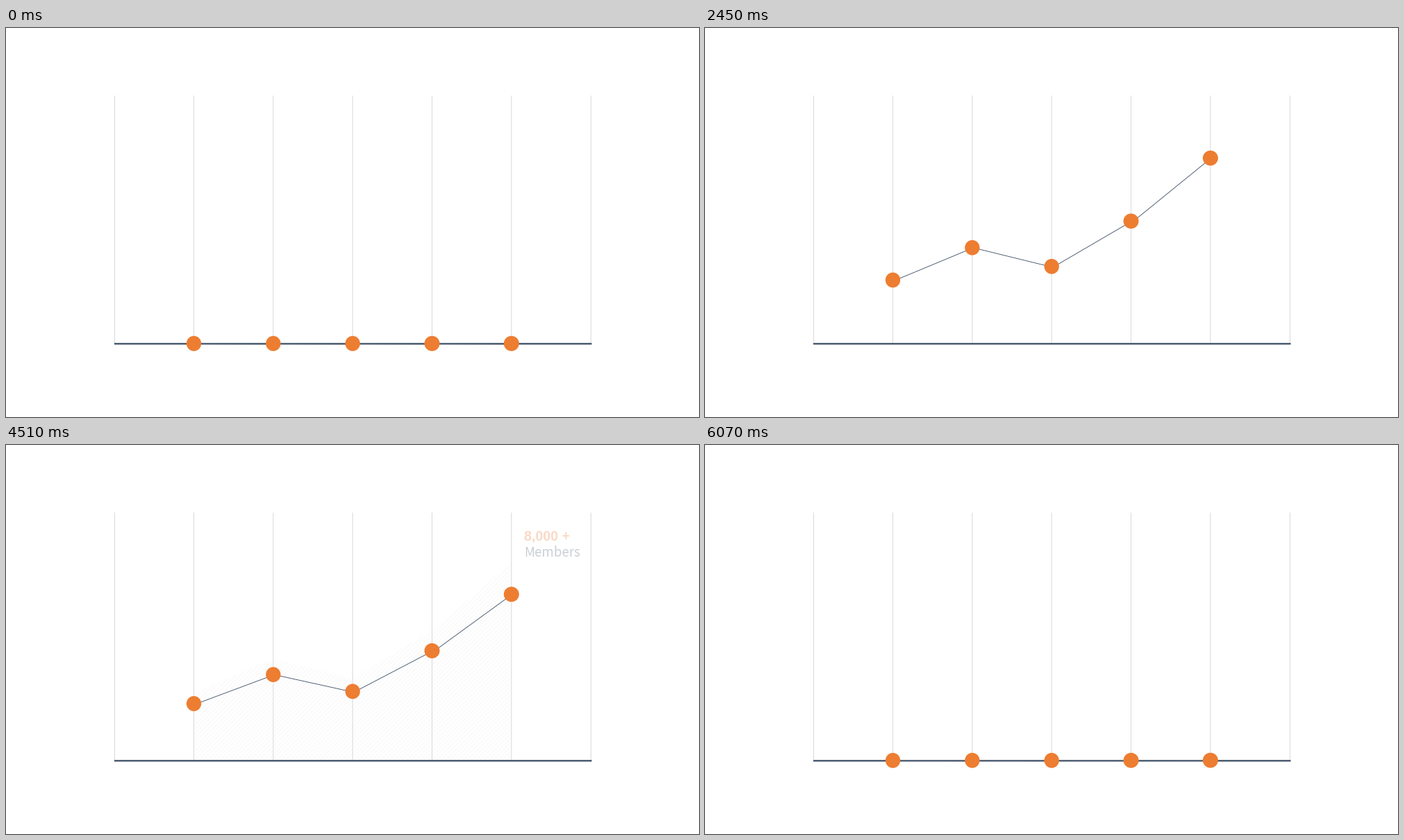
A matplotlib script that plays this animation: 998x561 px, repeating every 7.24 s.

```python
import numpy as np
import matplotlib.pyplot as plt
from matplotlib.animation import FuncAnimation
from matplotlib.collections import LineCollection
from matplotlib.patches import Ellipse, Polygon

W, H, DPI = 998, 561, 64
PT = 72 / DPI                       # points per pixel
LOOP, STEP = 7240, 20               # ms

ORANGE, NAVY, SLATE = "#ed7d31", "#34475f", "#44546a"
GRID, HATCH = "#d9d9d9", "#e6e6e6"

BASE = 455
GRID_X = np.linspace(156.4, 842.4, 7)
DOT_X = GRID_X[1:-1] - 0.2
HEIGHTS = np.array([98, 148, 119, 189, 286.3])
HATCH_GAP = 8 * W / 1280            # 8 px pattern on a 1280 px slide

RISE, FALL, MOVE = 1050, 4150, 2000
FADE_IN, FADE_OUT, FADE = 3070, 4150, 500

_s = np.linspace(0, 1, 2001)
EASE_X = 3 * _s * (1 - _s) * (0.3 * (1 - _s) + 0.245 * _s) + _s**3
EASE_Y = 3 * _s**2 - 2 * _s**3


def eased(t, start):
    """Bezier-eased progress, moving in 40 ms steps."""
    x = np.clip((t - start) // 40 * 40 / MOVE, 0, 1)
    return np.interp(x, EASE_X, EASE_Y)


def linear(t, start):
    return float(np.clip((t - start) / FADE, 0, 1))


fig = plt.figure(figsize=(W / DPI, H / DPI), dpi=DPI, facecolor="white")
ax = fig.add_axes([0, 0, 1, 1])
ax.set_xlim(0, W)
ax.set_ylim(H, 0)
ax.axis("off")

# Shaded area under the finished curve
area = Polygon([(DOT_X[0], BASE), *zip(DOT_X, BASE - HEIGHTS + 1), (DOT_X[-1], BASE)],
               closed=True, fc="none", ec="none")
ax.add_patch(area)
hatch = LineCollection([[(x, BASE), (x + 300, BASE - 300)]
                        for x in DOT_X[0] + HATCH_GAP * np.arange(-48, 75)],
                       colors=HATCH, linewidths=PT, zorder=1)
ax.add_collection(hatch, autolim=False)
hatch.set_clip_path(area)

for x in (GRID_X[0], *DOT_X, GRID_X[-1]):
    ax.plot([x, x], [97.5, 456], color=GRID, lw=PT, zorder=2,
            solid_capstyle="butt", snap=False)
ax.plot([156, 843.5], [455.4, 455.4], color=NAVY, lw=2.2 * PT, zorder=3,
        solid_capstyle="butt", snap=False)

links = LineCollection([], colors=SLATE, linewidths=0.9 * PT, zorder=4)
ax.add_collection(links, autolim=False)

dots = [ax.add_patch(Ellipse((x, BASE), w, 21.8, fc=ORANGE, ec="none", zorder=5))
        for x, w in zip(DOT_X, (21.3, 21.3, 21.3, 22, 22))]

labels = [ax.text(746.5, 138, "8,000 +", color=ORANGE, weight="bold", va="baseline",
                  family="Liberation Sans", size=19.7 * PT, zorder=6),
          ax.text(746, 160.7, "Members", color=SLATE, va="baseline",
                  family="Noto Sans CJK JP", size=18.7 * PT, zorder=6)]


def draw(n):
    t = n * STEP + 10
    ys = BASE - HEIGHTS * (eased(t, RISE) - eased(t, FALL))
    for dot, x, y in zip(dots, DOT_X, ys):
        dot.center = (x, y)
    links.set_segments([[(x0 + 3, y0 + 0.5), (x1, y1 + 0.8)] for x0, y0, x1, y1
                        in zip(DOT_X, ys, DOT_X[1:], ys[1:])])
    alpha = linear(t, FADE_IN) - linear(t, FADE_OUT)
    for artist in (hatch, *labels):
        artist.set_alpha(alpha)
    return [hatch, links, *dots, *labels]


anim = FuncAnimation(fig, draw, frames=LOOP // STEP, interval=STEP,
                     repeat=True, repeat_delay=0, blit=False)
plt.show()
```
